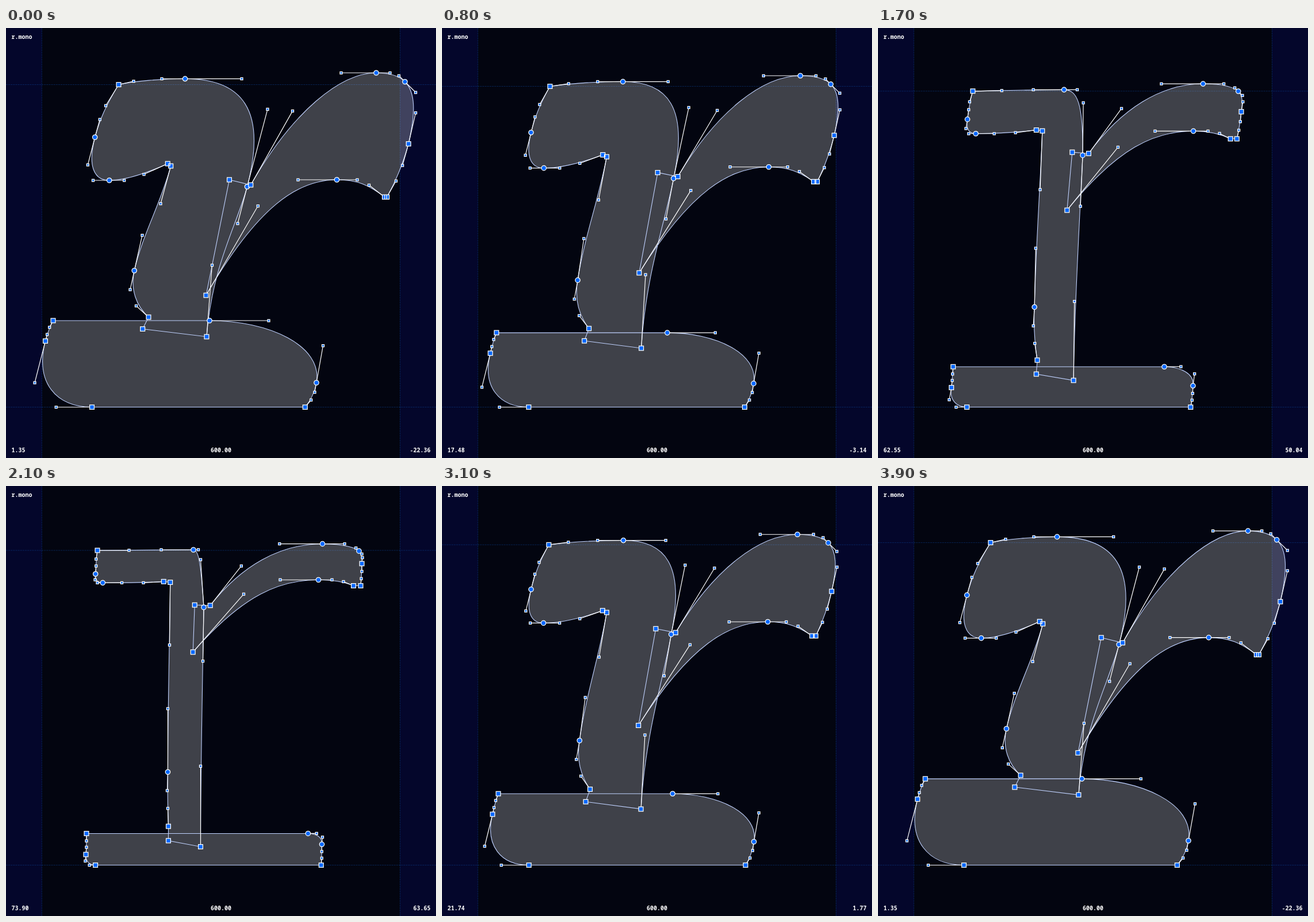
These frames come from a looping animation (748x748 px, 4 s). An HTML page:

```html
<!DOCTYPE html>
<html lang="en">
<head>
<meta charset="utf-8">
<title>Glyph interpolation</title>
<style>
  html, body { margin: 0; width: 100%; height: 100%; overflow: hidden; background: #030510; }
  svg { display: block; width: 748px; height: 748px; }
  .side { fill: #04062b; }
  .guide { stroke: #0a4298; stroke-width: 1; stroke-dasharray: 1 2; fill: none; }
  #outline { fill: rgba(255, 255, 255, .24); stroke: #c0d2ff; stroke-width: 1.1; }
  #levers { stroke: #fff; stroke-width: 1.2; fill: none; }
  .mark { fill: #0668ff; stroke: #fff; stroke-width: 1.25; }
  text { font: bold 10px "Noto Sans Mono", "DejaVu Sans Mono", monospace; fill: #fff; }
</style>
</head>
<body>
<svg viewBox="0 0 748 748">
  <rect width="748" height="748" fill="#030510"/>
  <rect class="side" width="62.3" height="748"/>
  <rect class="side" x="685.5" width="62.5" height="748"/>
  <path class="guide" d="M62.3 0V748M685.5 0V748M0 659.5H748"/>
  <path class="guide" id="xheight"/>
  <path id="outline"/>
  <path id="levers"/>
  <path class="mark" id="handles"/>
  <path class="mark" id="smooths"/>
  <path class="mark" id="corners"/>
  <text x="9.5" y="19">r.mono</text>
  <text x="9.5" y="738" id="left"></text>
  <text x="374" y="738" text-anchor="middle">600.00</text>
  <text x="738.5" y="738" text-anchor="end" id="right"></text>
</svg>
<script>
// Points: kind, casual x y, linear x y. S = corner, C = smooth, H = handle.
const S = 0, C = 1, H = 2;

const stem = [
  [S, 196, 98.5, 159, 112], [H, 222, 92.5, 214, 112], [H, 271, 88.3, 270, 111],
  [C, 311.5, 88.3, 326, 111], [H, 410, 88.3, 334.5, 111], [H, 455, 141.3, 338.5, 128],
  [C, 419.5, 276, 344, 211], [H, 403, 340, 342.5, 304.5], [H, 358.5, 412.5, 338.5, 487.5],
  [S, 349, 537, 338.5, 627.5], [S, 237.7, 523.5, 282.5, 617],
  [S, 248, 503, 282.5, 592], [H, 226.5, 483.3, 281.5, 561], [H, 216, 455, 280.5, 530],
  [C, 223.2, 422, 281.5, 497.5], [H, 237, 360.5, 281.5, 387.5], [H, 269, 305.5, 284.5, 276.5],
  [S, 286.7, 240, 285.7, 167.4],
  [S, 281.3, 236, 274.3, 166.3], [H, 240, 254.5, 239, 168.3], [H, 205.7, 265, 201.5, 168.3],
  [C, 179.7, 265, 168.3, 168.3], [H, 151.5, 265, 159, 168.3], [H, 142.3, 238, 155, 163],
  [C, 154.7, 190, 155.7, 153], [H, 163.3, 159, 156.7, 139], [H, 173.5, 135, 156.7, 127]
];

const bar = [
  [S, 82, 509, 140, 604.5],
  [C, 354, 509, 525.5, 604.5], [H, 457, 509, 540.3, 604.5], [H, 551.5, 552.6, 550.5, 611],
  [C, 540, 617, 549.5, 623.3], [H, 537, 633.5, 549.3, 636], [H, 530.7, 647, 549.3, 647.3],
  [S, 520.3, 659.5, 548.3, 659.5],
  [S, 149.5, 659.5, 155.6, 659.5], [H, 87.2, 659.5, 145.2, 659.5], [H, 50, 617, 138, 652.4],
  [S, 68.5, 544.4, 139, 641], [H, 71.6, 533, 140, 628.5], [H, 75.7, 520.5, 140, 617.3]
];

const arm = [
  [S, 388.5, 264, 328.2, 207],
  [S, 425.8, 273, 355.2, 207.8], [H, 498.5, 144.4, 409.3, 139.2], [H, 583, 78, 475.8, 100.7],
  [C, 644, 78, 550.5, 100.7], [H, 668, 78, 589, 100.7], [H, 683.5, 83, 608.7, 108],
  [C, 694, 93.5, 614, 113.2], [H, 712.6, 112, 619, 118.4], [H, 712.6, 147.5, 620, 124.7],
  [S, 700.2, 201.5, 619, 135], [H, 689.7, 239, 619, 148.5], [H, 678.5, 266, 618, 161],
  [S, 662.7, 294, 617, 173.5],
  [S, 658.5, 294, 604.5, 173.5], [H, 631.5, 273.3, 587, 166.3], [H, 611, 264, 567, 163.2],
  [C, 575.5, 264, 543.5, 163.2], [H, 508, 264, 477, 163.2], [H, 438.3, 309.5, 413.5, 188],
  [S, 348, 465, 325.2, 288.8]
];

// Side bearings: ms, left, right
const bearings = [
  [100, 1.35, -22.36], [800, 17.48, -3.14], [900, 21.74, 1.77],
  [1300, 40.84, 23.99], [1900, 73.90, 63.65]
];

const $ = id => document.getElementById(id);
const draw = (id, d) => $(id).setAttribute('d', d);
const mix = (a, b, u) => a + (b - a) * u;

const square = r => ([x, y]) => `M${x - r} ${y - r}h${2 * r}v${2 * r}h${-2 * r}z`;
const disc = r => ([x, y]) => `M${x - r} ${y}a${r} ${r} 0 1 0 ${2 * r} 0a${r} ${r} 0 1 0 ${-2 * r} 0z`;

// Blend amount for the outward half of the loop
function blend(ms) {
  const x = ms / 2000;
  return x * x * (1.533 - .332 * x - .122 * x * x);
}

function bearing(ms, col) {
  let i = 1;
  while (i < bearings.length - 1 && ms > bearings[i][0]) i++;
  const a = bearings[i - 1], b = bearings[i], from = blend(a[0]);
  const k = (blend(ms) - from) / (blend(b[0]) - from);
  return mix(a[col], b[col], Math.max(0, k)).toFixed(2);
}

function render(ms) {
  const u = blend(ms);
  const marks = [[], [], []];
  let outline = '', levers = '';

  for (const contour of [stem, bar, arm]) {
    const pts = contour.map(([kind, x0, y0, x1, y1]) => {
      const p = [mix(x0, x1, u), mix(y0, y1, u)];
      marks[kind].push(p);
      return p;
    });
    const n = pts.length;
    outline += 'M' + pts[0];
    for (let i = 0; i < n;) {
      const [a, b, c, d] = [0, 1, 2, 3].map(k => pts[(i + k) % n]);
      if (contour[(i + 1) % n][0] === H) {
        outline += `C${b} ${c} ${d}`;
        levers += `M${a}L${b}M${c}L${d}`;
        i += 3;
      } else {
        outline += 'L' + b;
        i++;
      }
    }
    outline += 'Z';
  }

  draw('xheight', `M0 ${mix(98.5, 112, u)}H748`);
  draw('outline', outline);
  draw('levers', levers);
  draw('corners', marks[S].map(square(3.9)).join(''));
  draw('smooths', marks[C].map(disc(4.2)).join(''));
  draw('handles', marks[H].map(square(2)).join(''));
  $('left').textContent = bearing(ms, 1);
  $('right').textContent = bearing(ms, 2);
}

// Ten poses a second, out and back
let shown = -1;
function tick() {
  const t = Math.floor(performance.now() % 4000 / 100) * 100;
  if (t !== shown) render(Math.min(t, 4000 - t));
  shown = t;
  requestAnimationFrame(tick);
}
tick();
</script>
</body>
</html>
```
